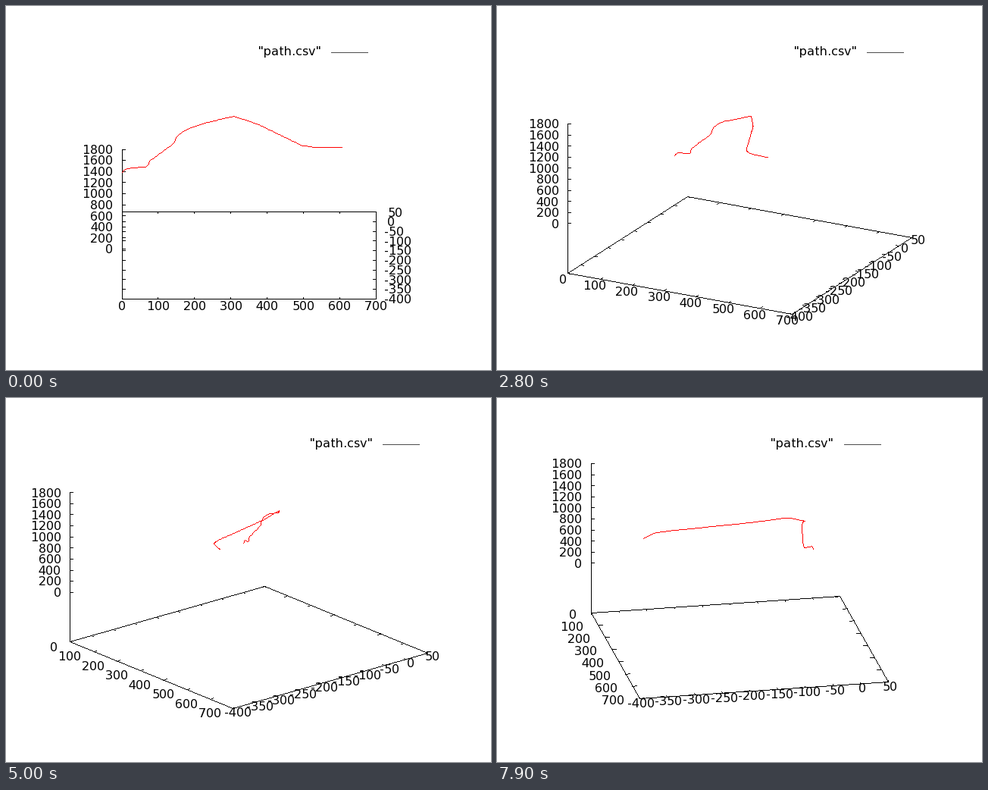
A matplotlib script for the animation above (8 s loop, 640 by 480 pixels).

```python
import numpy as np
import matplotlib.pyplot as plt
from matplotlib.animation import FuncAnimation

W, H, DPI = 640, 480, 100
FRAMES, STEP = 80, 100
BLACK, RED, GREY = (0, 0, 0), (255, 0, 0), (76, 76, 76)

CX, CY = 320, 328.5                 # centre of the floor on screen
R = 167.5                           # half edge of the floor
TILT = np.cos(np.radians(70))       # foreshortening of depth
Z0, Z_TOP = 65.7, 197.2             # heights of z = 0 and z = 1800
TIC = 4
X_GAIN = 1.52                       # x tics and label gaps are longer

X_VALS = np.arange(0, 701, 100)
Y_VALS = np.arange(-400, 51, 50)
Z_VALS = np.arange(0, 1801, 200)

# bends of the path: floor coordinates u, v and height h in pixels
BENDS = np.array([
    (-167, 131, 65), (-164, 130, 70), (-134, 112, 79), (-131, 110, 87),
    (-98, 103, 113), (-95, 102, 123), (-80, 101, 133), (-57, 99, 141),
    (-20, 69, 160), (12, 15, 168), (70, -114, 184), (85, -132, 188),
    (123, -153, 195)])


def round_off(bends, samples=150):
    """Resample evenly by length and soften the corners."""
    gaps = np.linalg.norm(np.diff(bends, axis=0), axis=1)
    at = np.concatenate([[0], np.cumsum(gaps)])
    even = np.linspace(0, at[-1], samples)
    pts = np.column_stack([np.interp(even, at, col) for col in bends.T])
    pts[1:-1] = (pts[:-2] + pts[1:-1] + pts[2:]) / 3
    return pts


PATH = round_off(BENDS)

plt.rcParams["text.hinting"] = "force_autohint"
plt.rcParams["text.hinting_factor"] = 1     # crisp one-pixel stems

fig = plt.figure(figsize=(W / DPI, H / DPI), dpi=DPI, facecolor="white")
ax = fig.add_axes([0, 0, 1, 1])
ax.axis("off")
canvas = ax.imshow(np.full((H, W, 3), 255, np.uint8), aspect="auto",
                   interpolation="nearest")


def draw(img, points, color):
    """One-pixel polyline without smoothing."""
    pts = np.floor(np.asarray(points) + 0.5).astype(int)
    for p, q in zip(pts[:-1], pts[1:]):
        n = np.abs(q - p).max() + 1
        x, y = (np.floor(np.linspace(a, b, n) + 0.5).astype(int)
                for a, b in zip(p, q))
        img[y, x] = color


def label(s, ha="center"):
    return ax.text(0, 0, s, family="DejaVu Sans", size=16 * 72 / DPI,
                   color="black", ha=ha, va="baseline")


def place(text, x, y, ha):
    text.set_ha(ha)
    text.set_position((x, y + 5.8))


key_text = label('"path.csv"', "right")
x_labels = [label(str(n)) for n in X_VALS]
y_labels = [label(str(n)) for n in Y_VALS]
z_labels = [label(str(n)) for n in Z_VALS]


def update(frame):
    a = np.radians(frame)
    c, s = np.cos(a), np.sin(a)
    img = np.full((H, W, 3), 255, np.uint8)

    def project(u, v, h=0):
        return np.array([CX + u * c + v * s,
                         CY + TILT * (u * s - v * c) - h])

    def tic(p, step):
        draw(img, [p, p + step], BLACK)

    corners = [project(u * R, v * R)
               for u, v in ((-1, -1), (1, -1), (1, 1), (-1, 1), (-1, -1))]
    draw(img, corners, BLACK)

    # x axis on the front edge, mirrored tics at the back
    inward = np.array([s, -TILT * c]) * TIC * X_GAIN
    right = s * X_GAIN >= 0.9
    for n, text in zip(X_VALS, x_labels):
        u = (n - 350) / 350 * R
        p, q = project(u, -R), project(u, R)
        tic(p, inward)
        tic(q, -inward)
        dx = -10.1 * X_GAIN * s - (4.5 if right else 0)
        place(text, p[0] + dx, p[1] + 9 * c, "right" if right else "center")

    # y axis on the right edge, mirrored tics on the left
    inward = np.array([-c, -TILT * s]) * TIC
    left = c >= 0.9
    for n, text in zip(Y_VALS, y_labels):
        v = (n + 175) / 225 * R
        p, q = project(R, v), project(-R, v)
        tic(p, inward)
        tic(q, -inward)
        dx = 10 * c + (5.5 if left and n >= 0 else 0.5 if left else 0)
        place(text, p[0] + dx, p[1] + 6 * s, "left" if left else "center")

    # z axis
    base = corners[0]
    tic(base, np.array([0, -Z_TOP]))
    for n, text in zip(Z_VALS, z_labels):
        p = base - [0, Z0 + n / 1800 * (Z_TOP - Z0)]
        tic(p, np.array([TIC, 0]))
        place(text, p[0] - 12, p[1], "right")

    draw(img, project(*PATH.T).T, RED)

    # the key follows the right end of the floor
    end = CX + R * (c + s) - 10.5
    draw(img, [(end - 48, 61), (end, 61)], GREY)
    key_text.set_position((end - 62, 65))

    canvas.set_data(img)
    return [canvas, key_text, *x_labels, *y_labels, *z_labels]


anim = FuncAnimation(fig, update, frames=FRAMES, interval=STEP,
                     repeat=True, repeat_delay=0, blit=False)
plt.show()
```
